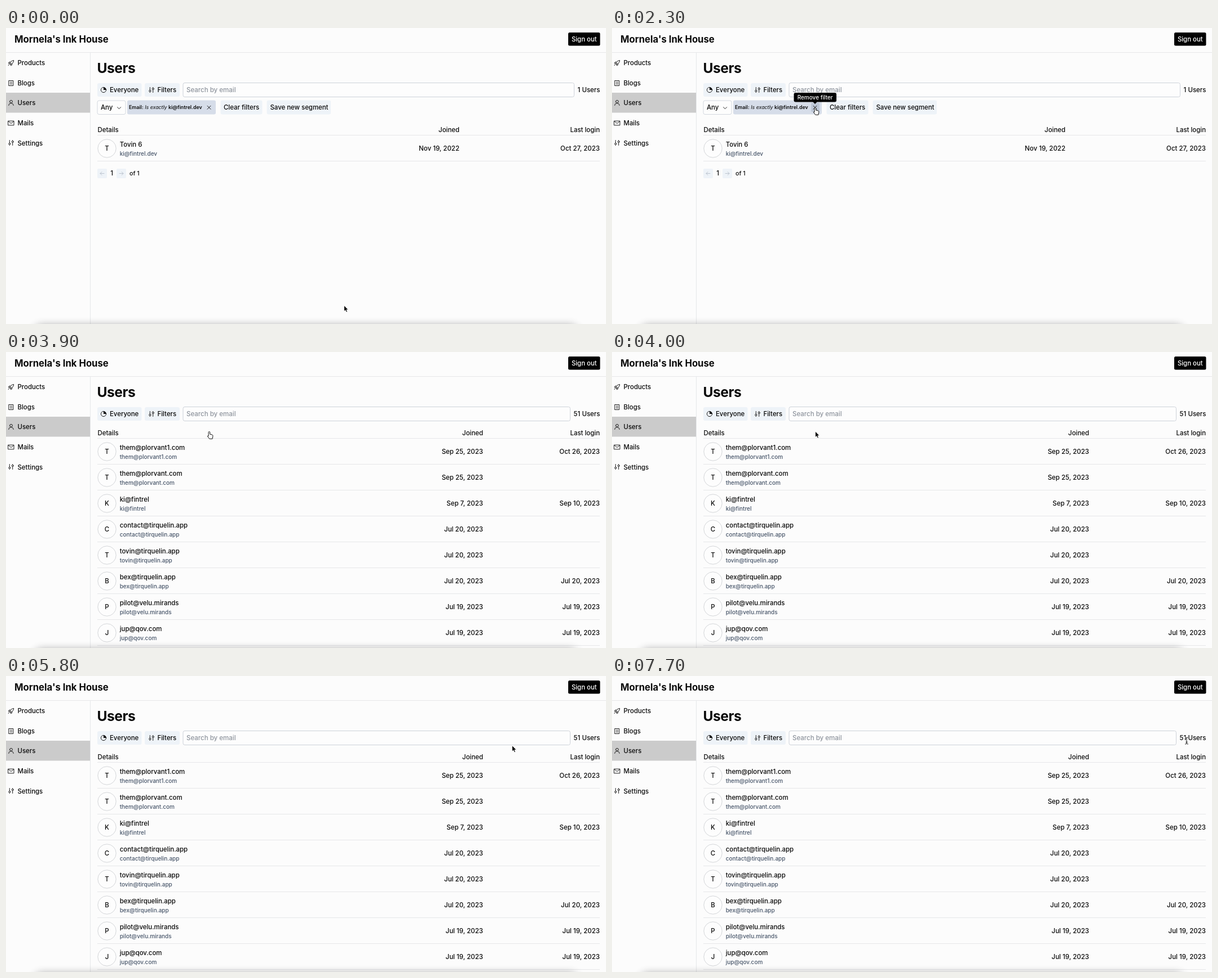
Write an HTML page that moves like this. It is 1064 px wide and 526 px high and loops after 8300 ms.

```html
<!DOCTYPE html>
<html lang="en">
<head>
<meta charset="utf-8">
<title>Users</title>
<style>
  html, body { margin: 0; width: 100%; height: 100%; overflow: hidden; background: #fcfcfc; }
  svg { display: block; width: 100%; height: 100%; }
  text { font: 450 11.5px Inter, sans-serif; fill: #0a0a0a; white-space: pre; }
  .medium { font-weight: 550; font-size: 11.4px; }
  .button { font-weight: 500; font-size: 11.4px; }
  .small { font-size: 10px; fill: #475569; }
  .chip { font-size: 8.8px; font-weight: 600; }
  .icon { fill: none; stroke: #111; stroke-width: .95; stroke-linecap: round; stroke-linejoin: round; }
  .soft { fill: #eef3f8; }
  .line { stroke: #e6e7e9; }
</style>
</head>
<body>
<svg id="stage" viewBox="0 0 1064 526">
  <defs>
    <filter id="blur" x="-10%" y="-200%" width="120%" height="500%"><feGaussianBlur stdDeviation="8"/></filter>
    <g id="sliders" class="icon">
      <path d="M-2.7-4.5V.2M-2.7 3.6V4.5M2.7-4.5V-3.6M2.7-.2V4.5"/>
      <circle cx="-2.7" cy="1.9" r="1.5"/><circle cx="2.7" cy="-1.9" r="1.5"/>
    </g>
  </defs>
  <rect width="1064" height="526" fill="#fcfcfc"/>
  <rect y="115" width="149" height="35.5" fill="#cbcbcb"/>
  <path class="line" d="M0 43.5H1064M149.5 43V526"/>
  <text x="15" y="26" style="font-size:16.7px;font-weight:700">Mornela's Ink House</text>
  <rect x="997" y="8" width="56.5" height="23.5" rx="2.5"/>
  <text x="1025.3" y="24" text-anchor="middle" class="button" style="fill:#fff">Sign out</text>

  <g class="icon">
    <path transform="translate(9 62)" d="M-2 1.8Q-1.5-3.5 4.7-4.5Q4.5 1.5-1.5 2.3ZM-1.5-1.5H-3.5L-4.7.8H-2.2M1.7 1.5V3.5L-.5 4.8V2.2M-3.2 2.5L-4.7 4.5"/>
    <path transform="translate(9 98)" d="M-3.8-4.5H3.8V4.5H-3.8Z"/>
    <path transform="translate(9 98)" stroke-opacity=".75" d="M-1.8-2H1.8M-1.8 0H1.8M-1.8 2H1.8"/>
    <path transform="translate(9 133)" d="M-4.2 4.6Q-4 .8 0 .8T4.2 4.6M-2.4-2.2a2.4 2.4 0 1 1 4.8 0a2.4 2.4 0 1 1-4.8 0"/>
    <path transform="translate(9 169)" d="M-5-3.8H5V3.8H-5ZM-4.6-3L0 .5L4.6-3"/>
  </g>
  <use href="#sliders" x="9" y="204"/>
  <g id="menu"></g>

  <text x="161.5" y="80" style="font-size:24.6px;font-weight:700;letter-spacing:-.02em">Users</text>
  <rect class="soft" x="162" y="98" width="78.5" height="24" rx="3"/>
  <rect class="soft" x="246" y="98" width="62" height="24" rx="3"/>
  <circle class="icon" cx="173" cy="110" r="4.6"/>
  <path d="M173 110V105.4A4.6 4.6 0 0 1 177.6 110Z"/>
  <text class="button" x="184" y="114.2">Everyone</text>
  <use href="#sliders" x="258" y="110"/>
  <text class="button" x="268.5" y="114.2">Filters</text>
  <rect id="search" x="314" y="97.5" height="25" rx="3" fill="#fdfdfd" stroke="#cdd2d9"/>
  <text x="320" y="114.2" style="fill:#8e949d">Search by email</text>
  <text id="count" x="1053.5" y="114.2" text-anchor="end"></text>

  <g id="filters">
    <rect x="162" y="129" width="50" height="24.5" rx="3" fill="#fdfdfd" stroke="#d3d8df"/>
    <text class="button" x="168" y="145.3">Any</text>
    <path class="icon" d="M197.5 140.7L200.5 143.7L203.5 140.7"/>
    <rect x="215" y="128.5" width="157" height="25" rx="3" fill="#d6dde9"/>
    <text class="chip" x="218" y="144.3">Email:</text>
    <text class="chip" x="246.2" y="144.3" style="font-weight:450;font-style:italic">Is exactly</text>
    <text class="chip" x="288" y="144.3">ki@fintrel.dev</text>
    <rect id="hover" x="353" y="133" width="15" height="16" rx="2" fill="#bdc7d7"/>
    <path class="icon" d="M357 138.3L363 144.3M363 138.3L357 144.3"/>
    <rect class="soft" x="380.5" y="128.5" width="74" height="25" rx="3"/>
    <text class="button" x="386" y="145.3">Clear filters</text>
    <rect class="soft" x="462.5" y="128.5" width="113.5" height="25" rx="3"/>
    <text class="button" x="468.5" y="145.3">Save new segment</text>
  </g>

  <g id="oneUser"></g>
  <g id="allUsers"></g>
  <rect x="52" y="530" width="960" height="40" rx="10" opacity=".45" filter="url(#blur)"/>

  <g id="tooltip">
    <rect x="322.5" y="115" width="75.5" height="16.5" rx="3"/>
    <path d="M356 131H364L360 135Z"/>
    <text x="360.2" y="127" text-anchor="middle" style="font-size:10px;fill:#fff">Remove filter</text>
  </g>
  <path id="arrow" d="M0 0V10.6L2.4 8.4L4 12L5.9 11.2L4.3 7.7H7.5Z" stroke="#fff" stroke-width=".8"/>
  <path id="hand" d="M-1.4 1.8a1.3 1.3 0 0 1 2.6 0V5.2L5 6Q6.6 6.6 6.4 8.3L5.5 13.3H.3L-3.2 8.7Q-3 7.2-1.4 8.4Z" fill="#fff" stroke="#111"/>
  <g id="beam" fill="none" stroke-linecap="round">
    <path d="M-2.5-6Q0-6 0-4.5Q0-6 2.5-6M0-4.5V4.5M-2.5 6Q0 6 0 4.5Q0 6 2.5 6M-1.3 2.5H1.3" stroke="#fff" stroke-width="2"/>
    <path d="M-2.5-6Q0-6 0-4.5Q0-6 2.5-6M0-4.5V4.5M-2.5 6Q0 6 0 4.5Q0 6 2.5 6M-1.3 2.5H1.3" stroke="#111"/>
  </g>
</svg>
<script>
const LOOP = 8300, STEP = 100;
const byId = id => document.getElementById(id);
const show = (id, visible) => byId(id).setAttribute("visibility", visible ? "visible" : "hidden");
const label = (x, y, text, cls = "", anchor = "start") =>
  `<text x="${x}" y="${y}" class="${cls}" text-anchor="${anchor}">${text}</text>`;

byId("menu").innerHTML = ["Products", "Blogs", "Users", "Mails", "Settings"]
  .map((name, i) => label(20.5, 66.2 + i * 35.6, name, "button")).join("");

function table(top, joinedX, users) {
  const head = label(162.5, top + 4.2, "Details", "medium") +
    label(joinedX, top + 4.2, "Joined", "medium", "end") +
    label(1053, top + 4.2, "Last login", "medium", "end") +
    `<path class="line" d="M162 ${top + 9.5}H1053"/>`;
  return head + users.map(([name, email, joined, login], i) => {
    const y = top + 33 + i * 46;
    return `<circle cx="179" cy="${y}" r="16.2" fill="#fdfdfd" stroke="#d4d6d9"/>` +
      label(179, y + 4.2, name[0].toUpperCase(), "medium", "middle") +
      label(201.7, y - 3, name, "medium") +
      label(201.7, y + 12.5, email, "small") +
      label(joinedX, y + 4.2, joined, "", "end") +
      label(1053, y + 4.2, login, "", "end") +
      `<path class="line" d="M162 ${y + 22.5}H1053"/>`;
  }).join("");
}

const pager = [[162, -1], [196, 1]].map(([x, dir]) =>
  `<rect x="${x}" y="250" width="17" height="17" rx="2" class="soft"/>
   <path class="icon" style="stroke:#b9c1cc" transform="translate(${x + 8.5} 258.5) scale(${dir} 1)" d="M-3.5 0H3.5M.7-2.8L3.5 0L.7 2.8"/>`
).join("") + label(187.5, 262.3, "1", "button", "middle") +
  `<text x="219" y="262.3" style="font-size:10.6px">of 1</text>`;

byId("oneUser").innerHTML =
  table(181, 804, [["Tovin 6", "ki@fintrel.dev", "Nov 19, 2022", "Oct 27, 2023"]]) + pager;

byId("allUsers").innerHTML = table(144, 846, [
  ["them@plorvant1.com", "Sep 25, 2023", "Oct 26, 2023"],
  ["them@plorvant.com", "Sep 25, 2023", ""],
  ["ki@fintrel", "Sep 7, 2023", "Sep 10, 2023"],
  ["contact@tirquelin.app", "Jul 20, 2023", ""],
  ["tovin@tirquelin.app", "Jul 20, 2023", ""],
  ["bex@tirquelin.app", "Jul 20, 2023", "Jul 20, 2023"],
  ["pilot@velu.mirands", "Jul 19, 2023", "Jul 19, 2023"],
  ["jup@qov.com", "Jul 19, 2023", "Jul 19, 2023"]
].map(([email, ...dates]) => [email, email, ...dates]));

// Pointer path: time, x, y
const path = [
  [0, 599.5, 493], [100, 588, 479], [300, 490, 345], [500, 425.5, 257], [700, 425.5, 257],
  [1100, 387.5, 174.5], [1400, 365, 152], [1600, 360.5, 147], [1900, 360.5, 141],
  [4300, 360.5, 141], [4700, 540, 190], [4900, 601, 270], [5000, 565, 338],
  [5100, 505, 333], [5200, 465, 300], [5300, 500, 196], [5400, 620, 209],
  [5600, 620, 209], [5700, 790, 160], [5800, 897.5, 123.5], [6000, 960, 112],
  [6500, 1018, 116], [6800, 1034, 124], [7000, 1030, 115], [7100, 1030, 115],
  [7700, 1019, 115], [LOOP, 1019, 115]
];

function pointerAt(t) {
  const i = path.findIndex(key => key[0] > t);
  const [t0, x0, y0] = path[i - 1], [t1, x1, y1] = path[i];
  const k = (t - t0) / (t1 - t0);
  return [x0 + (x1 - x0) * k, y0 + (y1 - y0) * k];
}

function draw(now) {
  const t = Math.floor((now % LOOP) / STEP) * STEP;
  const filtered = t < 3800, loaded = t >= 3900;
  const [x, y] = pointerAt(t);
  const cursor = t >= 5900 ? "beam" : t >= 1700 && t < 4000 ? "hand" : "arrow";

  show("filters", filtered);
  show("hover", filtered && t >= 1700);
  show("oneUser", !loaded);
  show("allUsers", loaded);
  byId("oneUser").setAttribute("transform", `translate(0 ${filtered ? 0 : -37})`);
  byId("count").textContent = loaded ? "51 Users" : "1 Users";
  byId("search").setAttribute("width", loaded ? 686.5 : 693.5);
  byId("search").setAttribute("stroke", t >= 5900 && x < 1001 ? "#b3bac5" : "#cdd2d9");

  show("tooltip", t >= 2200 && t < 3600);
  byId("tooltip").setAttribute("opacity", t < 2300 ? 0.6 : 1);

  for (const id of ["arrow", "hand", "beam"]) show(id, id === cursor);
  byId(cursor).setAttribute("transform", `translate(${x} ${y})`);
}

const start = performance.now();
function tick() {
  draw(performance.now() - start);
  requestAnimationFrame(tick);
}
tick();
</script>
</body>
</html>
```
